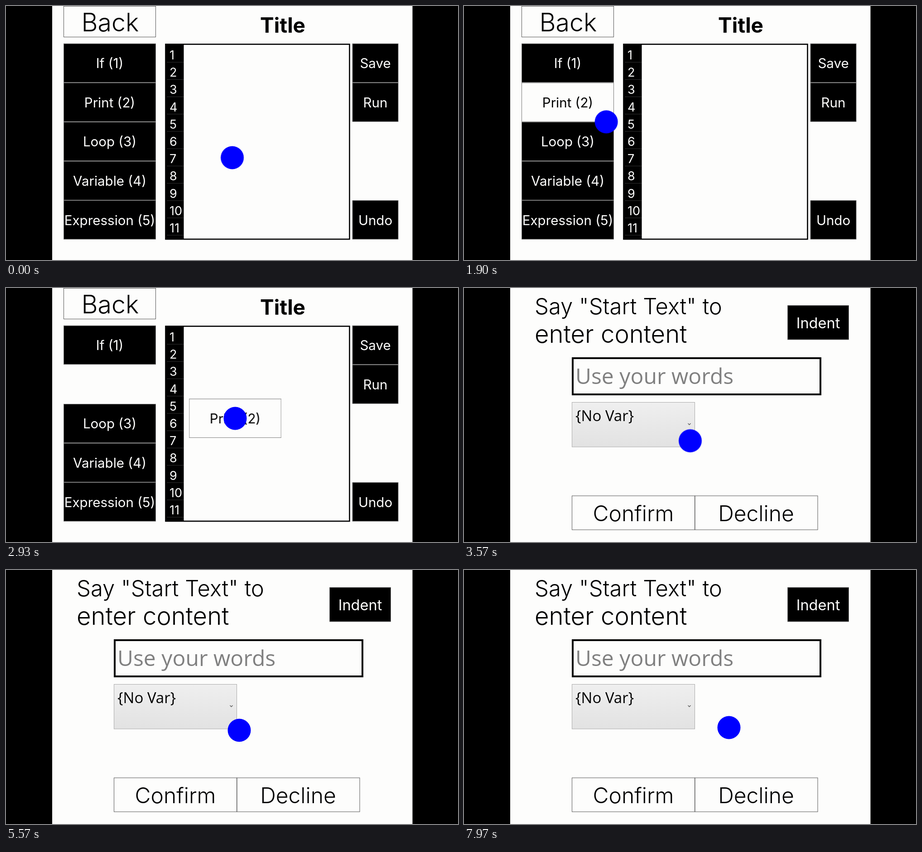
These frames come from a looping animation (998x561 px, 8000 ms). An HTML page:

```html
<!DOCTYPE html>
<html lang="en">
<head>
<meta charset="utf-8">
<title>Gaze controlled code editor</title>
<style>
  html, body { margin: 0; width: 100%; height: 100%; overflow: hidden; background: #000; }
  svg { display: block; width: 100vw; height: 100vh; font-family: Inter, Lato, sans-serif; }
  text { fill: #000; }
  .mid { text-anchor: middle; }
  .button { font-size: 29.5px; text-anchor: middle; }
  .button rect { fill: #000; stroke: #777; }
  .button text { fill: #fdfdfc; }
  .light rect { fill: #fdfdfc; }
  .light text { fill: #000; }
  .outline { fill: none; stroke: #555; }
  .numbers { font-size: 27px; }
  .numbers text { fill: #fdfdfc; }
  .large { font-size: 48px; font-weight: 360; }
  .system { font-family: "Open Sans", "Noto Sans", sans-serif; }

  .editor, .dialog, .idle, .hover, .carried { animation: 8s step-end infinite; }
  .editor { animation-name: editor; }
  .dialog { animation-name: dialog; }
  .idle { animation-name: idle; }
  .hover { animation-name: hover; }
  .carried { animation-name: carried; }
  .gaze { animation: gaze 8s ease-in-out infinite; }

  @keyframes editor { 0% { opacity: 1 } 41.5%, 100% { opacity: 0 } }
  @keyframes dialog { 0% { opacity: 0 } 41.5%, 100% { opacity: 1 } }
  @keyframes idle { 0% { opacity: 1 } 23.1%, 100% { opacity: 0 } }
  @keyframes hover { 0% { opacity: 0 } 23.1% { opacity: 1 } 30.6%, 100% { opacity: 0 } }
  @keyframes carried { 0% { opacity: 0 } 30.6% { opacity: 1 } 41.5%, 100% { opacity: 0 } }
  @keyframes gaze {
    0% { transform: translate(499.5px, 335px) }
    15% { transform: translate(553px, 330px) }
    19.5% { transform: translate(530px, 322px); animation-timing-function: ease-in }
    23.75% { transform: translate(314.5px, 256px); animation-timing-function: ease-out }
    27.5% { transform: translate(252px, 226px) }
    30.6% { transform: translate(240px, 218px) }
    36.625% { transform: translate(506px, 288px) }
    44.625% { transform: translate(499.5px, 337.5px) }
    69.625% { transform: translate(515px, 354px) }
    99.625%, 100% { transform: translate(585px, 348px) }
  }
</style>
</head>
<body>
<svg viewBox="0 0 998 561" preserveAspectRatio="none">
  <defs>
    <linearGradient id="shade" x2="0" y2="1">
      <stop stop-color="#efefef"/>
      <stop offset="1" stop-color="#e2e2e2"/>
    </linearGradient>
  </defs>
  <rect x="102" width="795.5" height="561" fill="#fdfdfc"/>

  <g class="editor">
    <rect class="outline" x="127.5" y=".5" width="203" height="68"/>
    <text class="mid large" x="230" y="56" style="font-size:55.5px">Back</text>
    <text class="mid" x="611" y="59" font-size="46" font-weight="700">Title</text>
    <rect x="352.5" y="84.5" width="406" height="430.5" fill="none" stroke="#000" stroke-width="2.6"/>
    <rect x="353" y="85" width="39.5" height="429" fill="#000"/>
    <g class="numbers" id="numbers"></g>
    <g id="buttons"></g>
  </g>

  <g class="dialog">
    <g class="large">
      <text x="156" y="58" style="font-size:49px">Say "Start Text" to</text>
      <text x="156" y="121" style="font-size:54.5px">enter content</text>
    </g>
    <g class="button" transform="translate(782 76.5)" style="font-size:32.5px">
      <rect x="-67.5" y="-38" width="135" height="75.5"/>
      <text y="12">Indent</text>
    </g>
    <rect x="240" y="155" width="547" height="80" fill="none" stroke="#000" stroke-width="4"/>
    <text class="system" x="246" y="212" font-size="48" style="fill:#808080">Use your words</text>
    <rect x="238.5" y="252.5" width="271" height="98.5" fill="url(#shade)" stroke="#aaa"/>
    <text class="system" x="246" y="294" font-size="33">{No Var}</text>
    <path d="M494.5 299l3 3 3-3" fill="none" stroke="#555" stroke-width="1.3"/>
    <rect class="outline" x="238.5" y="459" width="271" height="75"/>
    <rect class="outline" x="510" y="459" width="271" height="75"/>
    <g class="large mid">
      <text x="374" y="515">Confirm</text>
      <text x="645" y="515">Decline</text>
    </g>
  </g>

  <g class="gaze">
    <g id="cargo"></g>
    <circle r="25.5" fill="#00f"/>
  </g>
</svg>
<script>
  const $ = id => document.getElementById(id);
  const button = (label, x, y, width, state = '') => `
    <g class="button ${state}" transform="translate(${x} ${y})">
      <rect x="${-width / 2}" y="-43" width="${width}" height="85.5"/>
      <text y="11">${label}</text>
    </g>`;
  const rowY = row => 126.2 + row * 86.6;
  const block = (label, row, state) => button(label, 229, rowY(row), 203, state);
  const tool = (label, row) => button(label, 815.5, rowY(row), 101);

  $('buttons').innerHTML = [
    block('If (1)', 0),
    block('Print (2)', 1, 'idle'),
    block('Print (2)', 1, 'light hover'),
    block('Loop (3)', 2),
    block('Variable (4)', 3),
    block('Expression (5)', 4),
    tool('Save', 0),
    tool('Run', 1),
    tool('Undo', 4)
  ].join('');

  $('cargo').innerHTML = button('Print (2)', 0, 0, 203, 'light carried');

  const lineY = line => 86 + line * 38.2;
  $('numbers').innerHTML = Array.from({ length: 11 }, (_, i) => `
    <path d="M355 ${lineY(i + 1)}h37" stroke="#333"/>
    <text x="361" y="${lineY(i) + 32}">${i + 1}</text>`).join('');
</script>
</body>
</html>
```
